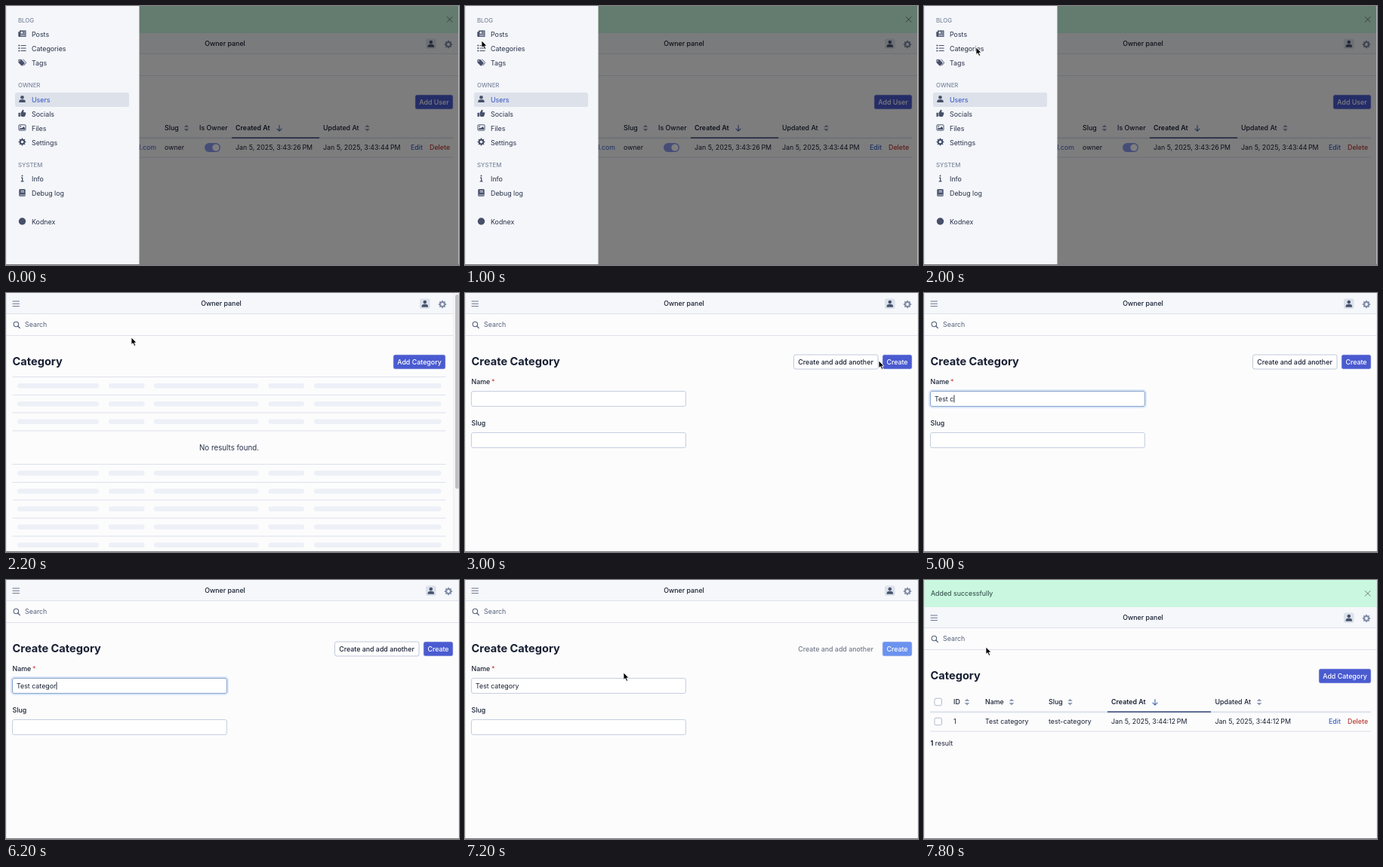
An HTML page for the animation above (8000 ms loop, 600 px wide and 344 px high).

```html
<!DOCTYPE html>
<html lang="en">
<head>
<meta charset="utf-8">
<title>Category panel</title>
<style>
  html, body { margin: 0; width: 100%; height: 100%; overflow: hidden; background: #fcfcfd; }
  svg { display: block; width: 100vw; height: 100vh; }
  text { font-family: Inter, sans-serif; white-space: pre; }
</style>
</head>
<body>
<svg id="stage" viewBox="0 0 600 344"></svg>
<script>
const INK = '#182033', MUTED = '#56617a', LINE = '#dde1ea', BLUE = '#3763c9', PRIMARY = '#4a5bd0';
const LOOP = 8000, STEP = 200, SIZE = 8.85;

// Drawing helpers; text is placed by its vertical centre.
const rect = (x, y, w, h, fill, r = 0, more = '') =>
  `<rect x="${x}" y="${y}" width="${w}" height="${h}" rx="${r}" fill="${fill}" ${more}/>`;
const path = (d, fill = 'none', more = '') => `<path d="${d}" fill="${fill}" ${more}/>`;
const stroke = (d, color, width = 1) =>
  path(d, 'none', `stroke="${color}" stroke-width="${width}" stroke-linecap="round" stroke-linejoin="round"`);
const at = (x, y, body) => `<g transform="translate(${x} ${y})">${body}</g>`;
const text = (x, y, label, { fill = INK, size = SIZE, weight = 400, anchor = 'start', id = '' } = {}) =>
  `<text ${id && `id="${id}"`} x="${x}" y="${y + size * 0.36}" fill="${fill}" font-size="${size}" ` +
  `font-weight="${weight}" text-anchor="${anchor}">${label}</text>`;
const scene = (id, body) => `<g id="${id}">${body}</g>`;

const gear = (color, r) => {
  const points = Array.from({ length: 32 }, (_, i) => {
    const angle = (i - 0.5) * Math.PI / 16, radius = i % 4 < 2 ? r : r * 0.76;
    return `${(radius * Math.sin(angle)).toFixed(2)} ${(radius * Math.cos(angle)).toFixed(2)}`;
  });
  const hole = r * 0.36;
  return path(`M${points.join('L')}ZM${-hole} 0a${hole} ${hole} 0 1 0 ${2 * hole} 0a${hole} ${hole} 0 1 0 ${-2 * hole} 0`,
    color, 'fill-rule="evenodd"');
};
const person = color => `<circle cy="-2.2" r="2.3" fill="${color}"/>` + path('M-4.2 4.5V3.4Q-4.2.8-1.5.8h3Q4.2.8 4.2 3.4V4.5Z', color);

const DARK = '#465069';
const icons = {
  news: path('M-3.5-4.5H5V4H-4Q-5.2 4-5.2 2.8V-2.8h1.7Z', DARK) +
    rect(-2, -3, 2.7, 2.6, '#f4f6fa') + stroke('M2-2.6H3.7M2-.8H3.7M-2 1H3.7M-2 2.6H3.7', '#f4f6fa', .7),
  list: stroke('M-1.5-3.5H4.7M-1.5 0H4.7M-1.5 3.5H4.7', DARK, 1.2) + stroke('M-4.2-3.5h.1M-4.2 0h.1M-4.2 3.5h.1', DARK, 1.9),
  tags: path('M-5-4H-1.2L3 .2Q3.5.8 3 1.4L.2 4.2Q-.4 4.7-1 4.2L-5 .2Z', DARK) +
    '<circle cx="-3.3" cy="-2.3" r=".8" fill="#f4f6fa"/>' + stroke('M1.2-4L4.8-.2Q5.2.4 4.8 1L2 4', DARK, 1),
  user: person(DARK),
  thumb: rect(-5, -.8, 2.3, 5.2, DARK, .5) +
    path('M-2-.5L0-3.7Q.5-5.2 1.6-4.7Q2.6-4 1.6-1.2H4Q5.3-1 4.8.4L3.8 3.5Q3.5 4.4 2.5 4.4H-.4L-2 3.5Z', DARK),
  image: rect(-4.5, -3.7, 9, 7.4, 'none', 1, `stroke="${DARK}"`) + path('M-3.4 2.6V1.4L-1.8-.1-.6 1 1.8-1.5 3.5.6V2.6Z', DARK) +
    `<circle cx="-2.2" cy="-1.7" r=".9" fill="${DARK}"/>`,
  gear: gear(DARK, 5),
  info: `<circle cy="-3.6" r="1" fill="${DARK}"/>` + stroke('M-1-.9H.2V3.8M-1.4 3.8H1.6', DARK, 1.3),
  book: rect(-4.2, -4.7, 8.4, 9.4, DARK, 1.2) + stroke('M-1.5-2.5H2.2M-1.5-.8H2.2M-2.8 3H3.5', '#f4f6fa', .8),
  dot: `<circle r="4.7" fill="${DARK}"/>`,
};

const button = (x, y, w, label, fill = PRIMARY) =>
  rect(x, y, w, 19, fill, 2.5, 'stroke="#c9cfea" stroke-width=".6"') +
  text(x + w / 2, y + 9.7, label, { fill: '#fff', weight: 500, anchor: 'middle' });

function topBar(y, width) {
  return rect(0, y, width, 27, '#f5f7fa') + rect(0, y + 27, width, 1, LINE) + rect(0, y + 56, width, 1, LINE) +
    stroke(`M9 ${y + 11}H17.5M9 ${y + 14.3}H17.5M9 ${y + 17.6}H17.5`, '#69758d') +
    text(width === 600 ? 290 : 285, y + 14, 'Owner panel', { weight: 500, anchor: 'middle' }) +
    rect(width - 44, y + 7.5, 13.5, 13.5, '#dce1eb', 2.5) +
    at(width - 37.2, y + 14.3, person('#48546e')) + at(width - 14, y + 15, gear('#7f8ba6', 5.3)) +
    `<circle cx="13.4" cy="${y + 41.5}" r="3.2" fill="none" stroke="${MUTED}" stroke-width="1.1"/>` +
    stroke(`M15.8 ${y + 44}L18.3 ${y + 46.5}`, MUTED, 1.2) + text(25, y + 42, 'Search', { fill: MUTED });
}

const banner = label => rect(0, 0, 600, 36, '#c9f7e0') + text(9, 17.5, label, { fill: '#26423d' }) +
  stroke('M584.3 14.5L591 21.2M591 14.5L584.3 21.2', '#6a7d7b');
const title = (y, label) => text(8.5, y, label, { size: 14.6, weight: 700 });

const sorter = x => at(x, 162, path('M-3.3-.9L0-4.2 3.3-.9ZM-3.3 1.1H3.3L0 4.4Z', '#929db5'));
const checkbox = y => rect(14, y - 4.8, 9.5, 9.5, '#fff', 2, 'stroke="#a7b1c3" stroke-width=".9"');

// Table with one row; the active column is the sorted creation date.
function table(columns, createdX, updatedX, lineEnd, created, updated) {
  return rect(8, 174.4, 584, 2, LINE) + rect(createdX - 5, 174.3, lineEnd - createdX + 5, 1.7, '#4a5a86') + rect(8, 200.5, 584, 1, LINE) +
    columns.map(([x, head, sortX, cell]) =>
      text(x, 162, head, { weight: 500 }) + (sortX ? sorter(sortX) : '') + text(x, 188, cell)).join('') +
    text(createdX, 162, 'Created At', { weight: 600 }) +
    stroke(`M${createdX + 58} 158.5V166M${createdX + 55} 163.2L${createdX + 58} 166.2 ${createdX + 61} 163.2`, '#4264b2', 1.1) +
    text(updatedX, 162, 'Updated At', { weight: 500 }) + sorter(updatedX + 58.5) +
    text(createdX, 188, created) + text(updatedX, 188, updated) +
    text(536, 188, 'Edit', { fill: BLUE, weight: 500 }) + text(561, 188, 'Delete', { fill: '#b83a30', weight: 500 });
}

function sidebar() {
  const heading = (y, label) => text(16, y, label, { size: 7.8, weight: 500, fill: '#7d879d' });
  const items = [[38, 'Posts', 'news'], [57, 'Categories', 'list'], [76, 'Tags', 'tags'],
    [124.5, 'Users', 'user'], [143.5, 'Socials', 'thumb'], [162.5, 'Files', 'image'], [181.5, 'Settings', 'gear'],
    [230, 'Info', 'info'], [249, 'Debug log', 'book'], [287, 'Kodnex', 'dot']];
  return rect(0, 0, 176.5, 344, '#f4f6fa') + rect(12, 115, 151, 19, '#dce1ea', 2.5) +
    heading(19.5, 'BLOG') + heading(105.5, 'OWNER') + heading(211, 'SYSTEM') +
    items.map(([y, label, icon]) => at(21.5, y - 1, icons[icon]) +
      text(34, y + .3, label, { fill: icon === 'user' ? '#3453c4' : '#273047' })).join('');
}

const usersPage = banner('') + topBar(36, 600) + button(542, 118, 50, 'Add User') +
  text(199, 188, 'l.com', { fill: BLUE, anchor: 'end' }) +
  table([[210, 'Slug', 239, 'owner'], [256, 'Is Owner', 0, '']], 304, 420, 415,
    'Jan 5, 2025, 3:43:26\u202fPM', 'Jan 5, 2025, 3:43:44\u202fPM') +
  rect(263, 182, 21, 12, '#8c9cf0', 6) + '<circle cx="278" cy="188" r="4.6" fill="#fff"/>' +
  rect(0, 0, 600, 344, '#000', 0, 'opacity=".5"') + sidebar();

const ruleYs = [111, 135, 158.5, 182.5, 227, 251, 274.5, 298.5, 322.5];
const pills = [[15, 108], [136, 47.5], [196, 138.5], [347.5, 47.5], [408, 168.5]];
const emptyPage = topBar(0, 592) + title(91, 'Category') + button(513, 82, 69, 'Add Category') +
  ruleYs.map((y, i) => rect(8.5, y, 574, 1, LINE) +
    (i === 3 ? '' : pills.map(([x, w]) => rect(x, y + 9, w, 6.4, '#edf0f7', 3)).join(''))).join('') +
  text(295.5, 205.3, 'No results found.', { size: 9.75, anchor: 'middle', fill: '#273149' }) +
  rect(592.5, 0, 7.5, 344, '#f7f7f8') + rect(592.5, 0, .7, 344, '#e5e5e8') + rect(595, 2, 5, 258, '#bfbfc1', 2.5);

const field = (y, id) => rect(8.5, y, 284, 20, '#fff', 2.5, `id="${id}" stroke="#c5cfdf"`);
const formPage = topBar(0, 600) + title(91, 'Create Category') +
  text(8.5, 118.3, 'Name', { weight: 500 }) + text(35, 117.5, '*', { fill: '#d23c36' }) +
  text(8.5, 173.2, 'Slug', { weight: 500 }) +
  rect(7, 129, 287, 23, 'none', 4, 'id="glow" stroke="#dbe7f8" stroke-width="2"') +
  field(130.5, 'nameField') + field(185.5, 'slugField') +
  text(14, 140.7, '', { id: 'typed' }) + rect(14, 135.5, .9, 10, INK, 0, 'id="caret"') +
  scene('ready', rect(435.5, 82, 111.5, 19, '#fff', 2.5, 'stroke="#b9c2d3" stroke-width=".9"') +
    text(491, 91.7, 'Create and add another', { weight: 500, anchor: 'middle' }) + button(553, 82, 39, 'Create')) +
  scene('saving', text(491, 91.7, 'Create and add another', { weight: 500, anchor: 'middle', fill: '#737b8b' }) +
    button(553, 82, 39, 'Create', '#6b92ef'));

const resultPage = banner('Added successfully') + topBar(36, 600) + title(127, 'Category') +
  button(523, 118, 69, 'Add Category') + checkbox(162) + checkbox(188) +
  table([[39, 'ID', 57, '1'], [81, 'Name', 116, 'Test category'], [165, 'Slug', 193.5, 'test-category']], 248, 385.5, 380,
    'Jan 5, 2025, 3:44:12\u202fPM', 'Jan 5, 2025, 3:44:12\u202fPM') +
  text(8.5, 217, '<tspan font-weight="700">1</tspan> result');

const byId = id => document.getElementById(id);
byId('stage').innerHTML = rect(0, 0, 600, 344, '#fcfcfd') +
  scene('users', usersPage) + scene('empty', emptyPage) + scene('form', formPage) + scene('result', resultPage) +
  rect(0, 0, .7, 344, '#d5d8df') + rect(599.4, 0, .6, 344, '#dfe1e6') + rect(0, 343, 600, 1, '#777a7f') +
  scene('pointer', path('M0 0V9.6L2.2 7.6 3.9 11.4 5.6 10.6 4 7H7Z', '#000', 'stroke="#fff" stroke-width=".8"'));

const show = (id, visible) => byId(id).style.display = visible ? '' : 'none';
const pointerPath = [[800, 4, 42], [1200, 40, 50], [1600, 67, 55], [2000, 69, 55], [2200, 166, 59], [2600, 542, 87],
  [2800, 548, 90], [3000, 548, 90], [3400, 245, 130], [3600, 196.5, 138], [7000, 196.5, 138], [7200, 210, 123], [7800, 82, 89]];

function pointerAt(time) {
  const next = pointerPath.findIndex(([t]) => t >= time);
  if (next <= 0) return pointerPath[0].slice(1);
  const [t0, x0, y0] = pointerPath[next - 1], [t1, x1, y1] = pointerPath[next];
  const k = (time - t0) / (t1 - t0);
  return [x0 + (x1 - x0) * k, y0 + (y1 - y0) * k];
}

function render(time) {
  show('users', time < 2200);
  show('empty', time >= 2200 && time < 3000);
  show('form', time >= 3000 && time < 7400);
  show('result', time >= 7400);

  const focused = time >= 3800 && time < 7000, saving = time >= 7000;
  show('ready', !saving);
  show('saving', saving);
  show('glow', focused);
  show('caret', focused);
  byId('nameField').setAttribute('stroke', focused ? '#86a3cb' : '#c5cfdf');
  const count = Math.max(0, (time - 3800) / STEP);
  byId('typed').textContent = 'Test\u00a0category'.slice(0, count);
  if (focused) byId('caret').setAttribute('x', 14.2 + byId('typed').getComputedTextLength());

  show('pointer', (time >= 800 && time < 4000) || time >= 7200);
  byId('pointer').setAttribute('transform', `translate(${pointerAt(time)})`);
}

const start = performance.now();
function tick() {
  const time = (performance.now() - start) % LOOP;
  render(Math.floor(time / STEP) * STEP);
  requestAnimationFrame(tick);
}
tick();
</script>
</body>
</html>
```
